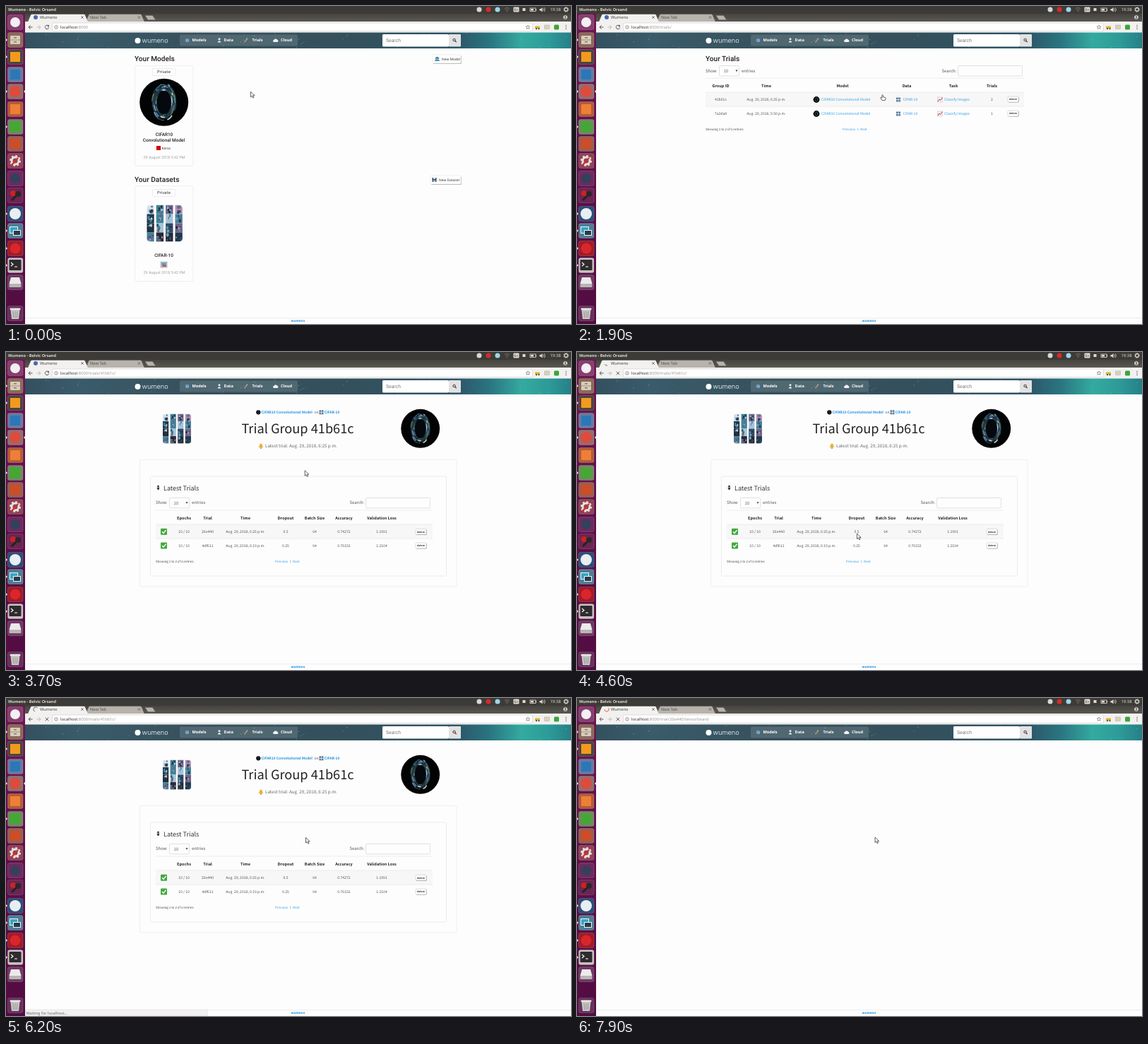
An HTML page for the animation above (8000 ms loop, 800 px wide and 450 px high).

```html
<!DOCTYPE html>
<html lang="en">
<head>
<meta charset="utf-8">
<title>Trials walkthrough</title>
<style>
html, body { margin: 0; width: 100%; height: 100%; overflow: hidden; background: #fdfdfd; }
svg { display: block; width: 800px; height: 450px; }
text { white-space: pre; text-rendering: geometricPrecision; }
.n { font-family: "Noto Sans", "Open Sans", sans-serif; }
.r { font-family: Roboto, sans-serif; }
.i { font-family: Inter, sans-serif; }
.s { font-family: "Noto Sans CJK JP", "Noto Sans CJK SC", "Noto Sans CJK", "Open Sans", sans-serif; }
</style>
</head>
<body>
<svg id="stage" viewBox="0 0 800 450" xmlns="http://www.w3.org/2000/svg"></svg>
<script>
const LOOP = 8000, STEP = 100;
const APP = 'Wumeno', BROWSER = 'Belvic Orsand';
const BLUE = '#2f9fe6';

let seed = 7;
const rnd = () => (seed = (seed * 16807) % 2147483647) / 2147483647;
const pick = list => list[Math.floor(rnd() * list.length)];

// Drawing helpers return SVG markup.
const rect = (x, y, w, h, fill, more = '') =>
  `<rect x="${x}" y="${y}" width="${w}" height="${h}" fill="${fill}" ${more}/>`;
const disc = (x, y, r, fill, more = '') => `<circle cx="${x}" cy="${y}" r="${r}" fill="${fill}" ${more}/>`;
const oval = (x, y, rx, ry, fill, more = '') =>
  `<ellipse cx="${x}" cy="${y}" rx="${rx}" ry="${ry}" fill="${fill}" ${more}/>`;
const path = (d, stroke, width = 1, fill = 'none', more = '') =>
  `<path d="${d}" stroke="${stroke}" stroke-width="${width}" fill="${fill}" ${more}/>`;
const shape = (d, fill) => path(d, 'none', 0, fill);
const text = (font, size, x, y, str, fill = '#333', weight = 400, anchor = 'start') =>
  `<text class="${font}" font-size="${size}" x="${x}" y="${y}" fill="${fill}" font-weight="${weight}" text-anchor="${anchor}">${str}</text>`;
const mid = (font, size, x, y, str, fill, weight) => text(font, size, x, y, str, fill, weight, 'middle');
const group = (id, body, hidden = false) =>
  `<g id="${id}"${hidden ? ' visibility="hidden"' : ''}>${body}</g>`;
const use = (id, x, y, sx, sy = sx) => `<use href="#${id}" transform="translate(${x} ${y}) scale(${sx} ${sy})"/>`;
const frame = (x, y, w, h, color = '#e6e6e6', more = '') =>
  rect(x + .5, y + .5, w - 1, h - 1, '#fdfdfd', `stroke="${color}" stroke-width=".7" rx="1.5" ${more}`);
const rule = (x1, x2, y, color = '#e6e6e6') => path(`M${x1} ${y}H${x2}`, color, .7);

// A dark disc with a ragged, glowing oval ring.
function eyeArt() {
  const tones = ['#e4f2f4', '#5a8fc0', '#2c5a80', '#5f8a5c', '#8fb8c8', '#24405c', '#4a5a48', '#101c28'];
  let out = disc(0, 0, 34.5, '#020304') + oval(0, 0, 13, 21, '#05090d', 'stroke="#1d3442" stroke-width="6"');
  for (let i = 0; i < 90; i++) {
    const a = rnd() * 6.28, len = .12 + rnd() * .5, k = .72 + rnd() * .42;
    const at = (b, m) => `${(Math.cos(b) * 15 * m).toFixed(1)} ${(Math.sin(b) * 24 * m).toFixed(1)}`;
    out += path(`M${at(a, k)}Q${at(a + len / 2, k * 1.06)} ${at(a + len, k)}`,
      pick(tones), (.5 + rnd() * 1.5).toFixed(1), 'none', 'opacity=".85"');
  }
  return out;
}

// Four separate columns of small abstract pictures.
function tileArt() {
  const tones = ['#2f4b68', '#6fa6c6', '#d6dfe8', '#262a36', '#b98fb4', '#3f8398', '#6f6488', '#1f3a4c', '#a8c4d8'];
  let out = '';
  for (let c = 0; c < 4; c++) {
    for (let r = 0; r < 4; r++) {
      const x = c * 13.4, y = r * 13;
      out += rect(x, y, 10.4, 13, pick(tones));
      for (let k = 0; k < 6; k++) {
        out += oval(x + 2 + rnd() * 6.4, y + 2 + rnd() * 9, .8 + rnd() * 1.2, .8 + rnd() * 2.2, pick(tones));
      }
    }
  }
  return `<g clip-path="url(#round)">${out}</g>`;
}

function defs() {
  const stops = list => list.map(([o, c]) => `<stop offset="${o}" stop-color="${c}"/>`).join('');
  return `<defs>
    <linearGradient id="sky">${stops([[0, '#34505f'], [.1, '#3a5b6a'], [.3, '#37515d'], [.6, '#34505c'],
      [.79, '#2d5567'], [.85, '#2a7480'], [.91, '#34aa9f'], [.96, '#2d9a98'], [1, '#267f88']])}</linearGradient>
    <linearGradient id="dock" x2="0" y2="1">${stops([[0, '#6d1750'], [.5, '#5f0f4a'], [1, '#510d42']])}</linearGradient>
    <linearGradient id="strip" x2="0" y2="1">${stops([[0, '#45433e'], [1, '#5c5953']])}</linearGradient>
    <clipPath id="round"><rect width="50.6" height="52" rx="5"/></clipPath>
    ${group('eye', eyeArt())}${group('tiles', tileArt())}
  </defs>`;
}

function topPanel() {
  const icon = '#dfdbd2';
  return rect(0, 0, 800, 11, '#3c3b37') +
    text('n', 5.6, 3, 7.2, `${APP} - ${BROWSER}`, icon, 700) +
    disc(670, 5, 3.5, '#d5d8da') + disc(683, 5, 3.5, '#d52b2b') + disc(696, 5, 3.5, '#9fd4ea') +
    path('M706 4a5 5 0 0 1 7 0M707.5 5.7a3 3 0 0 1 4 0', '#77746e', 1) + disc(709.5, 7.4, .8, '#77746e') +
    rect(718.5, 1.5, 8, 7, icon, 'rx="1"') + mid('n', 5, 722.5, 7, 'En', '#3c3b37') +
    rect(731.5, 3, 4, 4, icon) +
    rect(742, 3, 8, 4.5, 'none', `stroke="${icon}" stroke-width=".8"`) + rect(743, 4, 4, 2.5, icon) + rect(750, 4, 1, 2.5, icon) +
    shape('M755.5 4h1.8l2.2-2v6.4l-2.2-2h-1.8z', icon) + path('M760.8 3.2q1.4 2 0 4M762.3 2.2q2.2 3 0 6', icon, .7) +
    mid('n', 5.9, 778, 7.3, '19:38', icon) +
    disc(793, 5, 2.3, 'none', `stroke="${icon}" stroke-width="1.2"`) +
    disc(793, 5, 3.3, 'none', `stroke="${icon}" stroke-width="1" stroke-dasharray="1.3 1.29"`);
}

function dock() {
  const block = (y, c) => rect(6, y - 7, 14, 14, c);
  const icons = [
    [23, '#85406f', y => disc(13, y, 7, '#f3eff2')],
    [48, '#8a6a58', y => rect(6, y - 6, 14, 12, '#d8cdbd', 'rx="1"') + rule(6, 20, y, '#8b7b68') +
      rect(11, y - 4, 4, 1.5, '#8b7b68') + rect(11, y + 2, 4, 1.5, '#8b7b68')],
    [72, '#4a4540', y => block(y, '#f39a1e')],
    [97, '#6a7a9e', y => block(y, '#2a78b8')],
    [121, '#90706c', y => disc(13, y, 8, '#dd4b3e')],
    [146, '#b05d38', y => block(y, '#ef7f36')],
    [171, '#6f8a62', y => block(y, '#43a832')],
    [195, '#96604f', y => block(y, '#cf4c26')],
    [219, '#8f4353', y => disc(13, y, 5, 'none', 'stroke="#e6e3e0" stroke-width="3"') +
      disc(13, y, 7, 'none', 'stroke="#e6e3e0" stroke-width="2" stroke-dasharray="2.75 2.75"') + path(`M8 ${y + 6}l9 -10`, '#d22f2f', 2.5)],
    [244, '#6d2b60', y => disc(13, y, 7, '#33415a')],
    [268, '#6b2552', y => path(`M14 ${y + 1}l-6 6`, '#222', 3) + disc(10, y - 3, 4, '#c22') + disc(17, y - 2, 4, '#282828')],
    [294, '#27507a', y => disc(13, y, 8, '#e8eef2')],
    [318, '#4f7f92', y => rect(5, y - 6, 12, 10, '#f3f5f5') + rect(6, y - 5, 10, 8, '#35a5c8') +
      rect(10, y - 1, 11, 8, '#f3f5f5') + rect(11, y, 9, 6, '#243b4c')],
    [343, '#a01c25', y => disc(13, y, 7.5, '#d8262c')],
    [367, '#c6c2bd', y => rect(4.5, y - 8, 17, 15, '#2e2a2e', 'rx="1"') + path(`M7 ${y - 4}l3 2.5l-3 2.5M12 ${y + 2}h4`, '#fff', 1.2)],
    [391, '#6f3a62', y => shape(`M7 ${y - 7}h12l2.5 9h-17z`, '#eceaea') + rect(4.5, y + 2, 17, 5, '#b9b5b5', 'rx="1"')],
    [435, '#66305a', y => shape(`M6.5 ${y - 5}h13l-1.5 13h-10z`, '#c9c6c6') + rect(5.5, y - 7.5, 15, 2.5, '#e8e6e6', 'rx="1"') +
      path(`M10 ${y - 3}l.7 9M13 ${y - 3}v9M16 ${y - 3}l-.7 9`, '#8c8888', .8)]
  ];
  const pips = [48, 72, 121, 171, 294, 318, 343, 367];
  return rect(0, 10.5, 27, 440, 'url(#dock)') +
    icons.map(([y, tile, art]) => rect(2.5, y - 10.5, 21.5, 21, tile, 'rx="2.5" stroke="#ffffff40" stroke-width=".6"') + art(y)).join('') +
    pips.map(y => shape(`M0 ${y - 2}l2 2l-2 2z`, '#f2f2f2')).join('') + shape('M27 119l-2 2l2 2z', '#f2f2f2');
}

function browserBar() {
  const cross = (x, y, r, c) => path(`M${x - r} ${y - r}l${2 * r} ${2 * r}m0 ${-2 * r}l${-2 * r} ${2 * r}`, c, .9);
  const tab = (x, w) => `M${x} 22.5l4-9.5q.5-1.3 2-1.3h${w - 12}q1.5 0 2 1.3l4 9.5z`;
  const ink = '#555';
  return rect(27, 10.5, 773, 12, 'url(#strip)') +
    path(tab(113, 83), '#77736d', .5, '#b7b3ac') +
    path('M197 13.5h10.5l4 6h-10.5z', '#77736d', .5, '#b7b3ac') +
    disc(792, 16, 2.8, '#e4e1dc') + disc(792, 15.3, 1, '#4b4944') + shape('M790.2 17.8q1.8-2.4 3.6 0z', '#4b4944') +
    shape(tab(31, 85), '#f2f1f0') +
    rect(27, 22, 773, 15.5, '#f2f1f0') +
    text('n', 5.75, 48, 18.3, APP, '#444') + text('n', 5.75, 119, 18.3, 'New Tab', '#55524d') +
    cross(108, 16, 1.7, '#666') + cross(188.5, 16, 1.7, '#666') +
    group('favicon', disc(42, 16, 3, '#4a68b0')) +
    group('spinner', disc(0, 0, 3, 'none', 'id="arc" stroke-width="1"'), true) +
    path('M37.5 30h-5.5m2.6-2.6l-2.6 2.6l2.6 2.6', ink, 1) +
    path('M43.5 30h5.5m-2.6-2.6l2.6 2.6l-2.6 2.6', '#bbb', 1) +
    group('reload', path('M60 28a2.7 2.7 0 1 0 .7 2.5', ink, 1) + shape('M61 26.5v2.7h-2.7z', ink)) +
    group('stop', cross(58, 30, 2.3, ink), true) +
    rect(65.5, 24, 680, 11.5, '#fff', 'rx="1.5" stroke="#d0cdc9" stroke-width=".6"') +
    disc(71, 30, 2.4, 'none', 'stroke="#666" stroke-width=".6"') + rect(70.7, 29.5, .7, 1.8, '#666') + rect(70.7, 28.4, .7, .7, '#666') +
    '<text class="n" font-size="5.75" x="77" y="32" fill="#333">localhost<tspan id="url" fill="#999"></tspan></text>' +
    path('M739 27l.9 2h2.1l-1.7 1.4l.7 2.1l-2-1.3l-2 1.3l.7-2.1l-1.7-1.4h2.1z', '#666', .6) +
    rect(749, 28.5, 7, 3.5, '#d8b52f', 'rx="1"') + disc(751, 32.3, 1, '#333') + disc(754.5, 32.3, 1, '#333') +
    rect(762.5, 27, 7, 5.5, '#d9d3b4', 'stroke="#aaa" stroke-width=".5"') +
    rect(776, 26.5, 7, 7, '#3ba53b', 'rx="1.5"') +
    [27.5, 30, 32.5].map(y => disc(793, y, .7, ink)).join('');
}

function navBar() {
  let stars = '';
  for (let i = 0; i < 70; i++) {
    stars += disc((27 + rnd() * 773).toFixed(1), (38 + rnd() * 21).toFixed(1), (.2 + rnd() * .45).toFixed(2), '#cfe6ee', 'opacity=".5"');
  }
  const item = (x, label) => text('n', 5.6, x, 50.4, label, '#fff', 600);
  return rect(27, 37.5, 773, 22.5, 'url(#sky)') + stars +
    disc(186.5, 49, 4, '#fff') + text('i', 9.2, 192.5, 52, APP.toLowerCase(), '#fff', 300) +
    rect(246, 40.5, 167, 16, '#fff', 'opacity=".13" rx="2"') +
    group('hover', rect(330, 40.5, 41, 16, '#fff', 'opacity=".13"'), true) +
    disc(256.5, 48.5, 2.6, '#7fb4dc') + path('M254.5 48h4M256.5 46v5', '#3f7dac', .5) + item(263.5, 'Models') +
    disc(302, 46.7, 1.5, '#e8edf0') + shape('M299.5 51.5q2.5-5 5 0z', '#e8edf0') + item(308.5, 'Data') +
    path('M337.5 51.5l4-5', '#e58a3c', 1.4) + path('M340 47.5l2-2', '#6db4e2', 1.5) + item(348.5, 'Trials') +
    shape('M379 51a1.7 1.7 0 0 1 .5-3.2a2.5 2.5 0 0 1 4.5 0a1.7 1.7 0 0 1 .5 3.2z', '#eef2f4') + item(389, 'Cloud') +
    rect(533, 40, 94, 17.5, '#fff', 'rx="1.5"') + rect(627, 40, 17, 17.5, '#e2e2e2', 'rx="1"') +
    text('r', 6.8, 538, 51, 'Search', '#777') +
    disc(634.6, 48, 1.7, 'none', 'stroke="#222" stroke-width=".9"') + path('M635.8 49.3l1.9 1.9', '#222', 1.1);
}

const thumb = (x, y) => rect(x - 3, y - 3, 6, 6, '#5d7c99') + rect(x - .4, y - 3, .8, 6, '#e8eef2') + rect(x - 3, y - .4, 6, .8, '#e8eef2');

function modelsPage() {
  const pill = y => frame(207, y, 33.5, 11) + mid('n', 5.8, 223.5, y + 7.4, 'Private', '#333');
  const button = (x, y, tx, label, icon) =>
    rect(x + 1, y + 1, 644 - x, 12, '#b5b5b5', 'rx="1.5"') + rect(x, y, 644.2 - x, 12, '#fff', 'rx="1.5" stroke="#ddd" stroke-width=".5"') +
    icon + text('n', 4.9, tx, y + 8, label, '#333');
  const date = y => mid('r', 5.4, 224, y, '29 August 2018 5:42 PM', '#a2a2a2');
  const dots = 'stroke-dasharray="1.5 1"';
  return text('r', 10.1, 182, 78, 'Your Models', '#222', 500) +
    button(604, 69, 617, 'New Model', shape('M607 74l3.5-2.5l3.5 2.5z', '#3f83a8') + rect(608, 74, 5, 3, '#6fa7c4') + rect(607, 77, 7, 1, '#3f83a8')) +
    frame(182, 84, 83.5, 143, '#ddd', dots) + pill(88) + use('eye', 223.7, 136.3, 1, .97) +
    mid('r', 6.45, 224, 184, 'CIFAR10', '#222', 500) + mid('r', 6.45, 223.5, 192, 'Convolutional Model', '#222', 500) +
    rect(213, 198, 6, 6, '#d00000') + text('n', 4.8, 220.5, 203, 'Keras', '#333') + date(215.5) +
    text('r', 10.1, 182, 249, 'Your Datasets', '#222', 500) +
    button(601, 240, 613, 'New Dataset', rect(603.5, 243, 6, 6, '#33465a', 'rx=".5"') + rect(605, 243, 3, 2, '#dfe6ec') + rect(604.7, 246.5, 3.6, 2.5, '#9bc2dc')) +
    frame(182, 254, 83.5, 136, '#ddd', dots) + pill(259) + use('tiles', 199.3, 281.5, 1) +
    mid('r', 6.45, 223.5, 355, 'CIFAR-10', '#222', 500) +
    rect(219, 362, 9, 8, '#dfe4e8', 'stroke="#777" stroke-width=".5"') + rect(220, 363, 7, 4, '#5aa6dc') +
    shape('M220 369l3-4l2 2l2-1v3z', '#c05a4a') + date(378.5);
}

// Parts shared by both tables.
const cell = (x, y, str, fill = '#555') => mid('s', 5.1, x, y, str, fill, 300);
const link = (x, y, str) => text('s', 5.05, x, y, str, BLUE, 300);
const remove = (x, y) => rect(x + .6, y + .6, 15, 8, '#999', 'rx="1.5"') + rect(x, y, 15, 8, '#fff', 'rx="1.5" stroke="#bbb" stroke-width=".5"') +
  mid('n', 3.5, x + 7.5, y + 5.3, 'delete', '#333', 600);
const heads = (y, cols) => cols.map(([x, str]) => mid('s', 5.6, x, y, str, '#222', 700)).join('');

function tableFrame(x, y, searchX, end, pagerX, pagerY) {
  const label = (lx, str) => text('s', 6, lx, y + 9.5, str, '#555', 300);
  const page = (dx, str) => text('s', 4.5, pagerX + dx, pagerY, str, BLUE, 300);
  return label(x, 'Show') + frame(x + 19, y, 29, 15.5, '#d4d4d4') + text('s', 6, x + 25.5, y + 10, '10', '#666', 300) +
    shape(`M${x + 42.5} ${y + 6.5}h3l-1.5 2.5z`, '#333') + label(x + 51, 'entries') +
    label(searchX, 'Search:') + frame(searchX + 22.5, y, 92, 15.5, '#d4d4d4') +
    rule(x, end, y + 18.2) + rect(x, y + 38.5, end - x, 19.5, '#f7f7f7') + rule(x, end, y + 38.2) + rule(x, end, y + 58.2) +
    text('s', 4.4, x, pagerY, 'Showing 1 to 2 of 2 entries', '#444', 300) + page(0, 'Previous') + page(20.5, '1') + page(25, 'Next');
}

function listPage() {
  const row = (y, id, time, count) => cell(203.5, y, id) + cell(268, y, `Aug. 29, 2018, ${time} p.m.`) +
    use('eye', 339, y - 1.5, .128) + link(346, y, 'CIFAR10 Convolutional Model') +
    thumb(455, y - 1.5) + link(461.5, y, 'CIFAR-10') +
    rect(510.5, y - 5, 7, 7, '#f2f2f2', 'stroke="#bbb" stroke-width=".5"') + path(`M511 ${y + 1}l2-3l1.5 1.5l3-4`, '#d0303a', 1) +
    link(520, y, 'Classify Images') + cell(587.5, y, count) + remove(610, y - 6);
  return text('r', 10.1, 182, 78, 'Your Trials', '#222', 500) + tableFrame(182, 84, 516.5, 633, 376, 176) +
    heads(114.5, [[203.5, 'Group ID'], [268, 'Time'], [376, 'Model'], [467, 'Data'], [533, 'Task'], [587.5, 'Trials']]) +
    row(134, '41b61c', '6:25', 2) + row(154, '7a2da8', '5:50', 1);
}

function groupPage() {
  const xs = [252, 285.5, 339, 396, 437, 478.5, 532];
  const row = (y, values) => rect(219, y - 6.5, 9, 9, '#43a83f', 'rx="1"') + path(`M221 ${y - 2}l2 2.2l3.5-4.5`, '#fff', 1.3) +
    values.map((v, i) => cell(xs[i], y, v)).join('') + remove(580, y - 6);
  const bold = (x, str) => text('s', 5, x, 87.3, str, '#1d8fe0', 700);
  return use('tiles', 222, 87.5, .79, .81) + use('eye', 586.7, 108.3, .795) +
    use('eye', 357.3, 85.3, .09) + bold(361.5, 'CIFAR10 Convolutional Model') + text('s', 5, 436.5, 87.3, 'on', '#555', 300) +
    thumb(446.5, 85.3) + bold(450.7, 'CIFAR-10') +
    mid('s', 18.2, 413, 115, 'Trial Group 41b61c', '#222', 300) +
    shape('M357 135q2-1 2-4q2-3 4 0q0 3 1.5 4z', '#e8b23c') + disc(361, 136, 1, '#b97f1e') +
    text('s', 6.25, 367, 135, 'Latest trial: Aug. 29, 2018, 6:25 p.m.', '#666', 300) +
    frame(189, 152, 449.5, 180.5, '#e8e8e8') + frame(204, 175.5, 420, 142, '#e4e4e4') +
    disc(215.5, 190, 1.3, '#222') + shape('M213 193q2.5-3 5 0l-1.5 0v2h-2v-2z', '#222') +
    text('s', 9, 223, 195.5, 'Latest Trials', '#333', 300) + tableFrame(212, 205.8, 486.5, 604, 381, 298) +
    heads(236.7, ['Epochs', 'Trial', 'Time', 'Dropout', 'Batch Size', 'Accuracy', 'Validation Loss'].map((h, i) => [xs[i], h])) +
    row(256.3, ['10 / 10', '26e440', 'Aug. 29, 2018, 6:25 p.m.', '0.5', '64', '0.74272', '1.1991']) +
    row(276, ['10 / 10', '4df611', 'Aug. 29, 2018, 6:19 p.m.', '0.25', '64', '0.76152', '1.2104']);
}

const pointer = group('arrow', path('M0 0v7.5l1.8-1.6l1.3 2.8l1.4-.6l-1.3-2.7h2.4z', '#222', .7, '#fff')) +
  group('hand', path('M-.7 .8q.8-1.3 1.5 0v2.400l3 .7q1 .4.8 1.5l-.7 2.5h-4.5l-2-3q-.5-1.300.9-1l1 .8z', '#222', .7, '#fff'), true);

const stage = document.getElementById('stage');
stage.innerHTML = defs() + rect(0, 0, 800, 450, '#fdfdfd') + browserBar() + navBar() +
  group('models', modelsPage()) + group('list', listPage(), true) + group('group', groupPage(), true) +
  rule(27, 800, 441.5, '#e4e8ea') + mid('i', 4.7, 413.5, 447.2, APP.toLowerCase(), '#1d8fe0', 700) +
  group('status', rect(27, 441, 258, 9, '#f2f1f0', 'stroke="#d8d6d3" stroke-width=".5"') +
    '<text id="note" class="n" font-size="5.6" x="28.5" y="447.5" fill="#666"></text>', true) +
  topPanel() + dock() + group('cursor', pointer);

const el = id => document.getElementById(id);
const show = (id, on) => el(id).setAttribute('visibility', on ? 'visible' : 'hidden');
const within = (t, spans) => spans.some(([a, b]) => t >= a && t < b);
const latest = (t, table) => table.filter(([at]) => at <= t).pop()[1];

const pages = [[0, 'models'], [1400, 'list'], [2600, 'group'], [7200, 'blank']];
const urls = [[0, ':8000'], [1000, ':8000/trials/'], [2500, ':8000/trials/41b61c/'], [7100, ':8000/trial/26e440/tensorboard']];
const notes = [[0, ''], [800, 'localhost:8000/trials'], [1300, ''], [5000, 'Waiting for localhost...'], [7100, '']];
const busy = [[1000, 1500], [2400, 2800], [4500, LOOP]];
const waiting = [[2400, 2500], [4500, 7100]];
const hands = [[800, 1300], [1700, 2600]];
const trail = [[0, 346.5, 121.3], [200, 346.5, 121.3], [1000, 367, 54.5], [1200, 368.5, 55], [1800, 432.5, 125.5],
  [2400, 432.5, 125.5], [2900, 432.5, 136.5], [3400, 432.5, 136.5], [4300, 396.5, 257], [4800, 396.5, 257],
  [5800, 424.5, 197.5], [6500, 424.5, 197.5], [7000, 422, 197], [LOOP, 422, 197]];

function position(t) {
  const i = trail.findIndex(p => p[0] > t), [t0, x0, y0] = trail[i - 1], [t1, x1, y1] = trail[i];
  const u = (t - t0) / (t1 - t0), e = u * u * (3 - 2 * u);
  return [x0 + (x1 - x0) * e, y0 + (y1 - y0) * e];
}

function draw(t) {
  const page = latest(t, pages), note = latest(t, notes);
  const loading = within(t, busy), wait = within(t, waiting), hand = within(t, hands);
  ['models', 'list', 'group'].forEach(id => show(id, id === page));
  el('url').textContent = latest(t, urls);
  el('note').textContent = note;
  show('status', note !== '');
  show('hover', t >= 800 && t < 1300);
  show('favicon', !loading);
  show('spinner', loading);
  show('reload', !loading);
  show('stop', loading);
  const start = loading ? busy.find(([a, b]) => t >= a && t < b)[0] : 0;
  const arc = Math.min(11, 2 + (t - start) * .02);
  el('arc').setAttribute('stroke', wait ? '#777' : '#e8663c');
  el('arc').setAttribute('stroke-dasharray', `${arc} 30`);
  el('spinner').setAttribute('transform', `translate(42 16) rotate(${wait ? -90 - t * .2 : t * .36})`);
  show('arrow', !hand);
  show('hand', hand);
  el('cursor').setAttribute('transform', `translate(${position(t).join(' ')})`);
}

function tick() {
  draw(Math.floor(performance.now() % LOOP / STEP) * STEP);
  requestAnimationFrame(tick);
}
tick();
</script>
</body>
</html>
```
